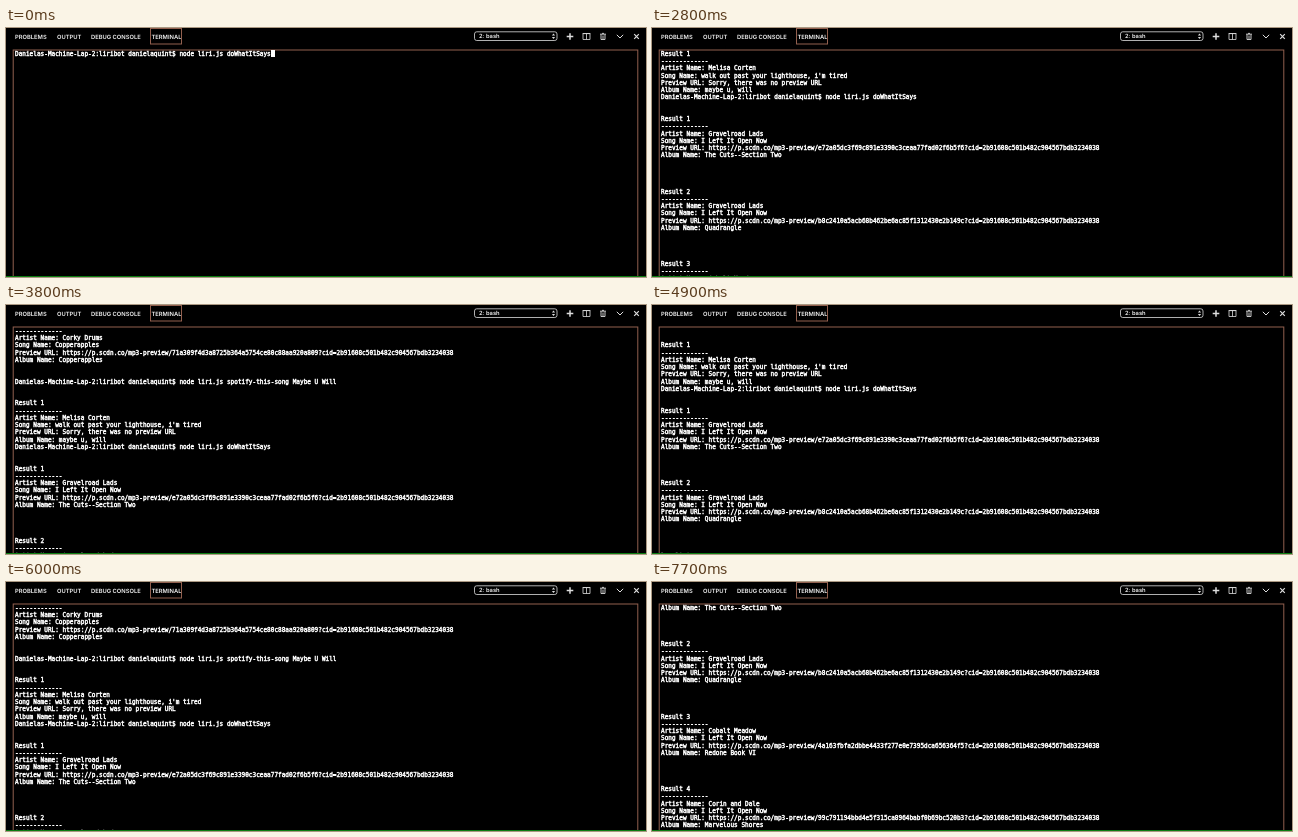
Write an HTML page that moves like this. It is 640 by 249 pixels and loops after 8000 ms.

```html
<!DOCTYPE html>
<html lang="en">
<meta charset="utf-8">
<title>Terminal session</title>
<style>
  html, body { margin: 0; height: 100%; overflow: hidden; background: #000; }
  #stage { position: relative; width: 640px; height: 249px; overflow: hidden; background: #000; }
  svg { position: absolute; left: 0; top: 0; }
  svg text { font: 600 5.8px Inter, sans-serif; fill: #f4f4f4; text-rendering: geometricPrecision; }
  .icon { fill: none; stroke: #ddd; }
  .frame { fill: none; stroke: #92604f; }
  #view { position: absolute; left: 0; top: 22px; width: 631px; height: 226px; overflow: hidden; }
  /* Laid out ten times larger so that glyph advances stay fractional */
  pre {
    position: absolute; left: 9.3px; top: 0; margin: 0; color: #fff;
    font: 60.7px/72.5px "DejaVu Sans Mono", monospace;
    -webkit-text-stroke: 4.5px #fff;
    transform: scale(.1); transform-origin: 0 0;
  }
  #cursor { position: absolute; width: 3.7px; height: 7.2px; background: #fff; }
</style>
<div id="stage">
  <svg width="640" height="249">
    <text x="9" y="10.6">PROBLEMS</text>
    <text x="51" y="10.6">OUTPUT</text>
    <text x="85" y="10.6">DEBUG CONSOLE</text>
    <text x="145.5" y="10.6">TERMINAL</text>
    <rect class="frame" x="144.5" y=".5" width="31" height="15.5"/>
    <rect class="frame" x="7.2" y="22" width="624.6" height="240"/>
    <rect class="icon" x="468.5" y="3.8" width="82.5" height="8.7" rx="2.2" stroke-width=".8"/>
    <text id="shell" x="473" y="10.3"></text>
    <path d="M545.9 7.6l1.6-2 1.6 2zM545.9 9l1.6 2 1.6-2z" fill="#ddd"/>
    <path class="icon" d="M564 5.2v6.6M560.7 8.5h6.6" stroke-width="1.5"/>
    <path class="icon" d="M577 5.5h7v6h-7zM580.5 5.5v6M576.6 5.6h7.8" stroke-width=".8"/>
    <path class="icon" d="M594 6.2h6M596 5.4h2M595 6.5v5h4v-5M597 7.5v3.5" stroke-width=".9"/>
    <path class="icon" d="M610.8 6.8l3.2 3.2 3.2-3.2" stroke-width="1"/>
    <path class="icon" d="M628.2 6.2l4.6 4.6M632.8 6.2l-4.6 4.6" stroke-width="1.2"/>
  </svg>
  <div id="view"><pre id="out"></pre><div id="cursor"></div></div>
  <svg width="640" height="249"><rect y="248" width="640" height="1" fill="#0b7d12"/></svg>
</div>
<script>
const $ = id => document.getElementById(id);
const LOOP = 8000, ROWS = 32, LEFT = 9.3, COL = 3.654, ROW = 7.25, RUN_LINE = 16;

const prompt = cmd => "Danielas-Machine-Lap-2:liribot danielaquint$ node liri.js " + cmd;
const url = hash => `https://p.scdn.co/mp3-preview/${hash}?cid=2b91608c501b482c904567bdb3234038`;
const result = (n, artist, song, preview, album) => [
  "Result " + n, "-".repeat(13), "Artist Name: " + artist, "Song Name: " + song,
  "Preview URL: " + preview, "Album Name: " + album
];
const gap = n => Array(n).fill("");
const song = "I Left It Open Now";

const lines = [
  ...result(1, "Corky Drums", "Copperapples", url("71a309f4d3a8725b364a5754ce80c88aa920a809"), "Copperapples").slice(1),
  ...gap(2), prompt("spotify-this-song Maybe U Will"), ...gap(2),
  ...result(1, "Melisa Corten", "walk out past your lighthouse, i'm tired", "Sorry, there was no preview URL", "maybe u, will"),
  prompt("doWhatItSays"), ...gap(2),
  ...result(1, "Gravelroad Lads", song, url("e72a05dc3f69c891e3390c3ceaa77fad02f6b5f6"), "The Cuts--Section Two"), ...gap(4),
  ...result(2, "Gravelroad Lads", song, url("b8c2410a5acb68b462be6ac85f1312430e2b149c"), "Quadrangle"), ...gap(4),
  ...result(3, "Cobalt Meadow", song, url("4a163fbfa2dbbe4433f277e0e7395dca656364f5"), "Redone Book VI"), ...gap(4),
  ...result(4, "Corin and Dale", song, url("99c791194bbd4e5f315ca8964babf0b69bc520b3"), "Marvelous Shores")
];

// Scroll gestures: start time, then the top line after each 100 ms step
const scrolls = [
  [1500, 24],
  [2600, 22, 16, 10, 8],
  [3300, 7, 6, 4, 2, 1, 0],
  [4900, 8, 9],
  [5500, 7, 6, 4, 2, 1, 0],
  [6700, 3, 12, 21, 24]
];

function topLine(t) {
  const [start, ...steps] = scrolls.filter(s => s[0] <= t).pop();
  return steps[Math.min(steps.length - 1, Math.floor((t - start) / 100))];
}

let shown;
function draw(now) {
  const t = now % LOOP, waiting = t < 1500, entered = t >= 200;
  const top = waiting ? RUN_LINE : topLine(t);
  const state = [top, waiting, entered, t >= 300].join();
  if (state !== shown) {
    shown = state;
    $("out").textContent = lines.slice(top, top + (waiting ? 1 : ROWS)).join("\n");
    $("shell").textContent = waiting && t >= 300 ? "2: node" : "2: bash";
    const cursor = $("cursor").style;
    cursor.display = waiting ? "block" : "none";
    cursor.left = LEFT + (entered ? 0 : lines[RUN_LINE].length * COL) + "px";
    cursor.top = (entered ? ROW : 0) + "px";
  }
}

const begin = performance.now();
function tick() {
  draw(performance.now() - begin);
  requestAnimationFrame(tick);
}
tick();
</script>
</html>
```
